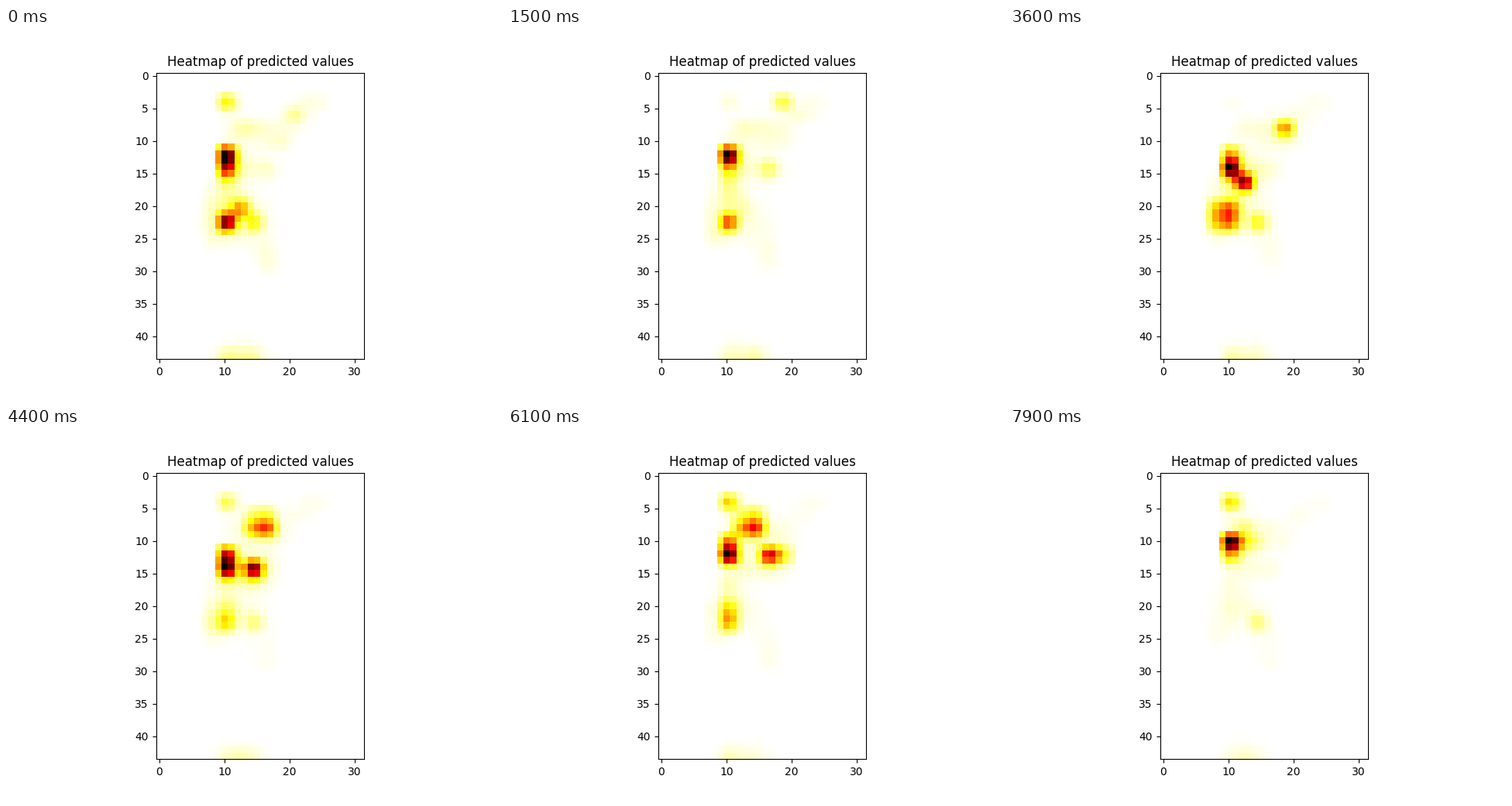
A matplotlib script that plays this animation: 640x480 px, repeating every 8000 ms.

```python
import numpy as np
import matplotlib.pyplot as plt
from matplotlib.animation import FuncAnimation

STEP, FRAMES = 100, 80
ROWS, COLS = 22, 16      # coarse prediction grid
H, W = 44, 32            # displayed grid
R, C = np.mgrid[:ROWS, :COLS]

KEYS = [0, 1500, 2800, 3600, 5300, 6900, 7900]

# walkers: row, column and heat at the key times, a single value stays fixed
WALKERS = [
    ([6.37, 6.18, 6.32, 6.71, 6.37, 5, 5.2], 5, 1.36),
    ([11, 11, 11, 10.5, 11, 10.2, 11], [5, 5, 5, 4.6, 5, 5, 5],
     [1.15, .7, .5, .63, .2, .88, .02]),
    ([10, 7, 7.63, 8, 6, 6, 5], [6, 8, 7, 6, 8, 8.5, 6.3],
     [.42, .15, .95, 1.15, 1.45, .48, .25]),
    ([3, 2, 2, 4, 3.4, 4, 4], [10, 9, 7, 9, 6, 7.3, 6],
     [.1, .24, .32, .54, .85, .66, .1]),
    (2, 5, [.32, .05, .04, .02, .52, .33, .37]),
    (11, 7, [.28, 0, 0, .32, 0, 0, .17]),
]

# faint trails: heat, start and end cell
TRAILS = [
    (.12, (8, 5), (10, 5.5)),
    (.05, (9.5, 4.2), (12, 4.2)),
    (.08, (4, 6), (4.5, 9)),
    (.04, (3, 10), (2, 11.5)),
    (.06, (7, 6), (7, 8)),
    (.04, (10, 7), (14, 8)),
    (.11, (21, 5), (21, 7)),
]


def tent(d):
    return np.clip(1 - abs(d), 0, 1)


def upsample(n, m):
    """Matrix for linear interpolation from m to n points, ends aligned."""
    return tent(np.linspace(0, m - 1, n)[:, None] - np.arange(m))


def ridge(heat, start, end):
    """Soft line between two cells."""
    (r0, c0), (r1, c1) = start, end
    dr, dc = r1 - r0, c1 - c0
    u = np.clip(((R - r0) * dr + (C - c0) * dc) / (dr**2 + dc**2), 0, 1)
    d2 = (R - r0 - u * dr)**2 + (C - c0 - u * dc)**2
    return heat * np.exp(-2 * d2)


def at(track, ms):
    return np.interp(ms, KEYS, track) if isinstance(track, list) else track


UP_Y, UP_X = upsample(H, ROWS), upsample(W, COLS)
FLOOR = sum(ridge(*t) for t in TRAILS)
rng = np.random.default_rng(4)
phase = rng.uniform(0, 2 * np.pi, (ROWS, COLS))
period = rng.uniform(500, 1300, (ROWS, COLS))


def field(ms):
    waver = 1 + .3 * np.sin(2 * np.pi * ms / period + phase)
    grid = FLOOR * waver * (1 - .5 * ms / (STEP * FRAMES))
    haze = np.zeros_like(grid)
    for walker in WALKERS:
        r, c, heat = (at(track, ms) for track in walker)
        spot = tent(R - r) * tent(C - c)
        grid += heat * spot / spot.max()
        haze += heat * .08 * np.exp(-((R - r)**2 + (C - c)**2) / 1.6)
    haze[:2] = haze[:8, :5] = 0    # nobody walks up there
    out = UP_Y @ (grid + haze) @ UP_X.T
    return out / out.max()


fig, ax = plt.subplots(figsize=(6.4, 4.8), dpi=100)
im = ax.imshow(field(0), cmap="hot_r", vmin=0, vmax=1,
               interpolation="nearest")
ax.set_title("Heatmap of predicted values")


def update(i):
    im.set_data(field(i * STEP))
    return (im,)


anim = FuncAnimation(fig, update, frames=FRAMES, interval=STEP,
                     repeat=True, repeat_delay=0)
plt.show()
```
